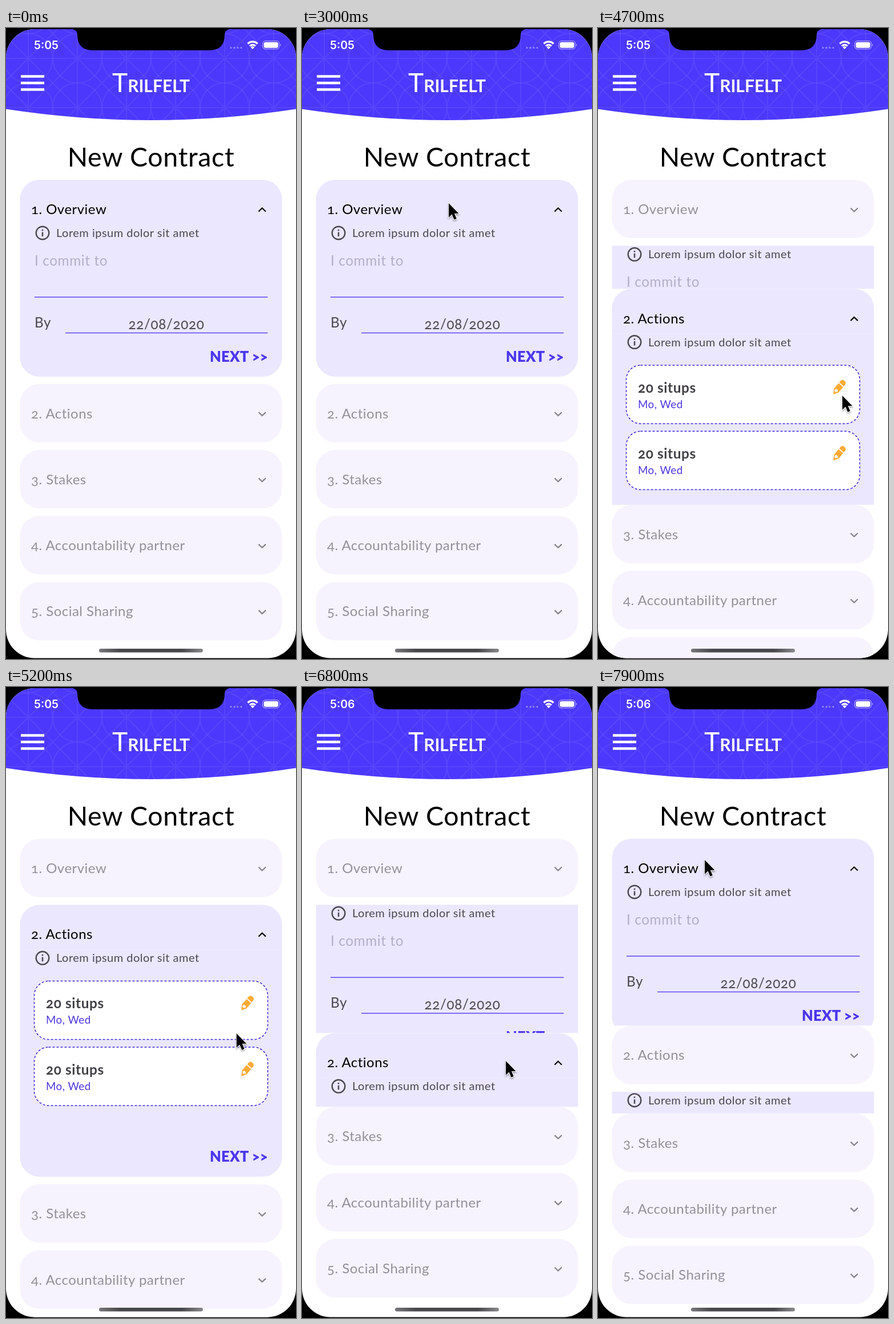
Recreate the animation shown at these times as an HTML page. Size 508x1102 px, loop 8000 ms.

```html
<!DOCTYPE html>
<html lang="en">
<head>
<meta charset="utf-8">
<title>New Contract</title>
<style>
  html, body { margin: 0; width: 100%; height: 100%; overflow: hidden; background: #000; }
  svg { display: block; }
  text { font: 24.3px Lato, "Open Sans", sans-serif; letter-spacing: .025em;
         font-variant-numeric: oldstyle-nums; fill: #4a4850; }
  .head rect { fill: #f6f3fe; }
  .head text { fill: #94919a; font-size: 24px; letter-spacing: .02em; }
  .head path { fill: none; stroke: #85828b; stroke-width: 2.2; }
  .head.open rect { fill: #ebe7fe; }
  .head.open text { fill: #000; }
  .head.open path { stroke: #000; }
  .panel { fill: #ebe7fe; }
  .rule { stroke: #5a45ee; stroke-width: 1.6; }
  .next { font-size: 25.5px; font-weight: 900; letter-spacing: .01em; fill: #4b36f0; text-anchor: end; }
  .box { fill: #fff; stroke: #3d2bd0; stroke-width: 1.5; stroke-dasharray: 4 3; }
  .title { font-size: 46.5px; letter-spacing: .015em; fill: #000; text-anchor: middle; }
  .brand { font-size: 30px; font-weight: 700; letter-spacing: 0; fill: #fff; text-anchor: middle; }
  .brand tspan { font-size: 46px; font-weight: 400; }
  #clock { font: 600 19.5px Inter, sans-serif; letter-spacing: 0; fill: #fff; }
</style>
</head>
<body>
<svg width="508" height="1102" viewBox="0 0 508 1102">
  <defs>
    <clipPath id="screen"><rect y="2" width="508" height="1098.5" rx="50"/></clipPath>
    <pattern id="lattice" width="86" height="86" x="-4" y="10" patternUnits="userSpaceOnUse">
      <rect width="86" height="86" fill="#4b38fc"/>
      <g fill="none" stroke="#fff" stroke-opacity=".06" stroke-width="2">
        <circle cx="43" cy="43" r="43"/>
        <path d="M0 0L86 86M86 0L0 86M43 0V86M0 43H86"/>
      </g>
    </pattern>
    <linearGradient id="bar">
      <stop offset="0" stop-color="#77777b"/><stop offset=".2" stop-color="#48484b"/>
      <stop offset=".8" stop-color="#48484b"/><stop offset="1" stop-color="#8a8a8e"/>
    </linearGradient>
    <filter id="shadow" x="-50%" y="-50%" width="200%" height="200%">
      <feDropShadow dx="0" dy="2" stdDeviation="1.5" flood-opacity=".4"/>
    </filter>
    <g id="info">
      <circle cx="64" cy="15" r="11.3" fill="none" stroke="#4a4850" stroke-width="2.4"/>
      <path d="M64 13.5V21M64 8.7V11.2" stroke="#4a4850" stroke-width="2.5"/>
      <text x="88" y="22" style="font-size:20px">Lorem ipsum dolor sit amet</text>
    </g>
    <g id="task">
      <rect class="box" x="49.5" y="55.3" width="409" height="102" rx="25"/>
      <text x="70" y="103" style="font-weight:700;fill:#424046">20 situps</text>
      <text x="70" y="130" style="font-size:18.8px;fill:#4b36e0">Mo, Wed</text>
      <path d="M412 106.5L413.5 96L425 82.5Q428 79.5 431 82L433 84Q435 87 432.5 90L421.5 103Z" fill="#fbab36"/>
      <path d="M421.5 85.5L430 93M415.5 98.5L420 101.5" stroke="#fff" stroke-width="1.8"/>
      <circle cx="417" cy="99.5" r="2.6" fill="#fff"/>
    </g>
  </defs>

  <g clip-path="url(#screen)">
    <rect width="508" height="1102" fill="#fff"/>
    <g id="list"></g>

    <svg class="content" width="508">
      <rect class="panel" x="24.5" y="-50" width="459" height="316" rx="34"/>
      <use href="#info"/>
      <text x="50" y="72" style="fill:#b4afc8">I commit to</text>
      <path class="rule" d="M50 127H458.5M104 189.5H458.5"/>
      <text x="50" y="180">By</text>
      <text x="281" y="183" text-anchor="middle">22/08/2020</text>
      <text class="next" x="459" y="240">NEXT &gt;&gt;</text>
    </svg>
    <svg class="content" width="508">
      <rect class="panel" x="24.5" y="-50" width="459" height="447" rx="34"/>
      <use href="#info"/>
      <use href="#task"/>
      <use href="#task" y="115.3"/>
      <text class="next" x="459" y="371">NEXT &gt;&gt;</text>
    </svg>

    <path d="M0 0H508V141.5Q254 180.5 0 141.5Z" fill="url(#lattice)"/>
    <path d="M26 84.5H67M26 96H67M26 107.5H67" stroke="#fff" stroke-width="4.4"/>
    <text class="brand" x="254" y="112"><tspan>T</tspan>RILFELT</text>
    <text class="title" x="254" y="242">New Contract</text>

    <text id="clock" x="49" y="36.5"></text>
    <path d="M394 34.5H414" stroke="#fff" stroke-opacity=".35" stroke-width="3.6" stroke-linecap="round" stroke-dasharray="0 6"/>
    <path d="M423.5 27.5A12 12 0 0 1 440.5 27.5M427 31.5A7 7 0 0 1 437 31.5" fill="none" stroke="#fff" stroke-width="3.2"/>
    <path d="M432 37L428.6 33.6A5 5 0 0 1 435.4 33.6Z" fill="#fff"/>
    <rect x="449.7" y="22.7" width="29" height="14" rx="4.5" fill="none" stroke="#fff" stroke-opacity=".5" stroke-width="1.3"/>
    <rect x="451.7" y="24.7" width="25" height="10" rx="2.6" fill="#fff"/>
    <path d="M480.5 27.5Q483 29.7 480.5 32Z" fill="#fff" fill-opacity=".6"/>
    <rect x="163" y="1084" width="182" height="6.5" rx="3.2" fill="url(#bar)"/>
  </g>
  <path d="M117 0V2Q125 4 125 12Q125 39 152 39H356Q383 39 383 12Q383 4 391 2V0Z"/>
  <path id="cursor" d="M0 0V27.5L6.2 21.8L10.6 32L15.3 30L11 20H19.5Z" stroke="#fff" stroke-width="2" paint-order="stroke" filter="url(#shadow)"/>
</svg>

<script>
const LOOP = 8000, STEP = 100, SLIDE = 300;
const TOP = 265, CLOSED = 102.3, OPEN = 78, PITCH = 115.3;
const titles = ['1. Overview', '2. Actions', '3. Stakes', '4. Accountability partner', '5. Social Sharing'];
const fullHeight = [278.5, 410];

// Each click swaps the open section; the two slides begin a few ms apart.
const clicks = [[4594, 4594], [5770, 5769], [6779, 6787], [7743, 7736]];

// Pointer stops: time, x, y.
const stops = [
  [1200, 130, 938], [1300, 158, 890], [1900, 236, 420], [2300, 257, 306],
  [3400, 257, 306], [4300, 428, 646], [4700, 428, 642], [5100, 428, 642],
  [5600, 195, 287], [5900, 195, 287], [6500, 357, 653], [6900, 357, 653],
  [7500, 187, 302], [8000, 187, 302]
];

const $ = id => document.getElementById(id);
const clamp = x => Math.min(1, Math.max(0, x));
const easeOut = x => 1 - (1 - clamp(x)) ** 3;
const smooth = x => x * x * (3 - 2 * x);

$('list').innerHTML = titles.map(title => `<svg class="head" width="508">
  <rect x="24.5" width="459" rx="34"/><text x="44" y="60">${title}</text><path/></svg>`).join('');
const heads = [...document.querySelectorAll('.head')];
const contents = [...document.querySelectorAll('.content')];

function place(node, y, height) {
  node.setAttribute('y', y);
  node.setAttribute('height', height);
}

function drawSections(t) {
  const done = clicks.filter(c => t >= Math.min(...c)).length;
  const active = done % 2;
  let y = TOP;
  heads.forEach((head, i) => {
    const open = i === active;
    const [box, , chevron] = head.children;
    head.classList.toggle('open', open);
    place(head, y, open ? OPEN : CLOSED);
    box.setAttribute('height', open ? 160 : CLOSED);
    chevron.setAttribute('d', open ? 'M442.5 55.5l6.2 -6l6.3 6' : 'M442.5 49.5l6.2 6l6.3 -6');
    y += open ? OPEN : PITCH;
    if (i >= contents.length) return;
    const p = done ? easeOut((t - clicks[done - 1][i]) / SLIDE) : 1;
    const height = fullHeight[i] * (open ? p : 1 - p);
    place(contents[i], y, height);
    y += height;
  });
}

function drawCursor(t) {
  const next = stops.findIndex(s => s[0] > t);
  $('cursor').style.display = next > 0 ? '' : 'none';
  if (next < 1) return;
  const [t0, x0, y0] = stops[next - 1], [t1, x1, y1] = stops[next];
  const k = smooth((t - t0) / (t1 - t0));
  $('cursor').setAttribute('transform', `translate(${x0 + (x1 - x0) * k} ${y0 + (y1 - y0) * k}) scale(.9)`);
}

function frame() {
  const t = Math.floor(performance.now() % LOOP / STEP) * STEP;
  $('clock').textContent = t < 6300 ? '5:05' : '5:06';
  drawSections(t);
  drawCursor(t);
  requestAnimationFrame(frame);
}
frame();
</script>
</body>
</html>
```
